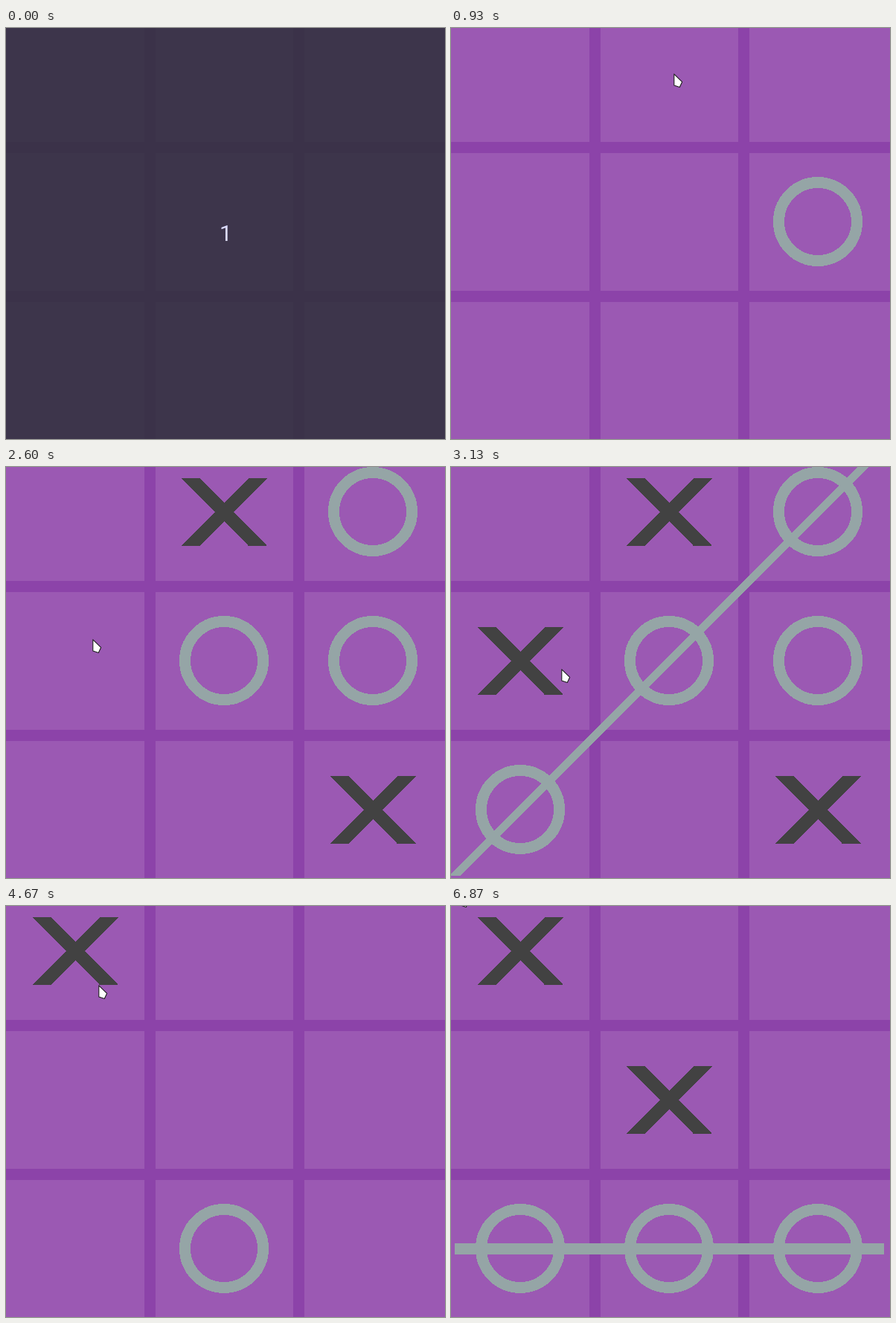
An HTML page that plays this animation: 590x552 px, repeating every 6.99 s.

```html
<!DOCTYPE html>
<html lang="en">
<head>
<meta charset="utf-8">
<title>Noughts and crosses</title>
<style>
  html, body { margin: 0; width: 100%; height: 100%; overflow: hidden; background: #9b59b3; }
  svg { display: block; width: 590px; height: 552px; }
  #board { shape-rendering: crispEdges; }
  .gap { fill: #8c43a9; }
  .x { fill: #424242; }
  .o { fill: none; stroke: #95a5a6; stroke-width: 15; }
  .win { fill: #95a5a6; }
  .cursor { fill: #fff; stroke: #1c1c1c; stroke-width: 1.1; stroke-linejoin: round; }
  .shade { fill: rgb(45, 47, 57); fill-opacity: .85; }
  .count { font: 30px Roboto, Arial, sans-serif; fill: #dcdcff; text-anchor: middle; }
</style>
</head>
<body>
<svg viewBox="0 0 590 552">
  <defs>
    <path id="x" class="x" d="M36 15H61L151 106H126ZM126 15H151L61 106H36Z"/>
    <circle id="o" class="o" cx="93" cy="60" r="52.5"/>
    <path id="diagonal" class="win" d="M546.5 0H561.5L12.5 549H-2.5Z"/>
    <path id="row" class="win" d="M5 453H582V468H5Z"/>
  </defs>
  <g id="board">
    <g class="gap">
      <rect x="186" width="15" height="552"/>
      <rect x="386" width="15" height="552"/>
      <rect y="153" width="590" height="15"/>
      <rect y="353" width="590" height="15"/>
    </g>
  </g>
  <path id="cursor" class="cursor" d="M.8 .8V16L8.3 18.4L11.6 11.4Z"/>
  <g id="countdown">
    <rect class="shade" width="590" height="552"/>
    <text class="count" x="295.5" y="286">1</text>
  </g>
</svg>
<script>
// All times are in ticks of 1/15 s
const LOOP_MS = 6990, TICK_MS = 1000 / 15;

// Noughts start and the marks alternate; cells count from 0 at the top left,
// waits are the pauses before each move
const games = [
  { start: 0, end: 65, cells: '5128436', waits: [2, 14, 7, 7, 3, 7, 3], win: 'diagonal' },
  { start: 65, end: 105, cells: '70648', waits: [3, 2, 9, 2, 3], win: 'row' }
];

// Where the pointer rests: arrival time, length of the glide there, place
const stops = [
  { at: 13, glide: 0, x: 306, y: 36 },
  { at: 15, glide: 2, x: 292, y: 85 },
  { at: 29, glide: 3, x: 519, y: 394 },
  { at: 39, glide: 4, x: 116, y: 231 },
  { at: 49, glide: 4, x: 179, y: 310 },
  { at: 57, glide: 4, x: 341, y: 14 },
  { at: 69, glide: 0, x: 124, y: 106 },
  { at: 76, glide: 3, x: 288, y: 312 },
  { at: 89, glide: 5, x: 342, y: 377 },
  { at: 95, glide: 5, x: 290, y: 0 },
  { at: 103, glide: 7, x: 12, y: -17 }
];
const pointerSeen = t => t >= 13 && (t <= 57 || t >= 69);

const board = document.getElementById('board');
const cursor = document.getElementById('cursor');
const timed = [{ el: document.getElementById('countdown'), on: 0, off: 1 }];

function place(shape, x, y, on, off) {
  const el = document.createElementNS('http://www.w3.org/2000/svg', 'use');
  el.setAttribute('href', '#' + shape);
  el.setAttribute('transform', `translate(${x} ${y})`);
  board.append(el);
  timed.push({ el, on, off });
}

for (const { start, end, cells, waits, win } of games) {
  let t = start;
  waits.forEach((wait, i) => {
    t += wait;
    place('ox'[i % 2], cells[i] % 3 * 200, Math.floor(cells[i] / 3) * 200, t, end);
  });
  place(win, 0, 0, t, end);
}

const show = (el, on) => { el.style.display = on ? '' : 'none'; };
const ease = p => p * p * (3 - 2 * p);

function pointerAt(t) {
  let { x, y } = stops[0];
  for (const { at, glide, x: toX, y: toY } of stops) {
    if (t <= at - glide && t < at) break;
    const p = t >= at ? 1 : ease((t - at + glide) / glide);
    x += (toX - x) * p;
    y += (toY - y) * p;
  }
  return [x, y].map(Math.round);
}

function draw(ms) {
  // Small lead, since each tick is shown at the nearest 10 ms
  const t = Math.floor((ms % LOOP_MS + 3.4) / TICK_MS);
  for (const { el, on, off } of timed) show(el, t >= on && t < off);
  show(cursor, pointerSeen(t));
  cursor.setAttribute('transform', `translate(${pointerAt(t)})`);
}

const start = performance.now();
function loop() {
  draw(performance.now() - start);
  requestAnimationFrame(loop);
}
loop();
</script>
</body>
</html>
```
